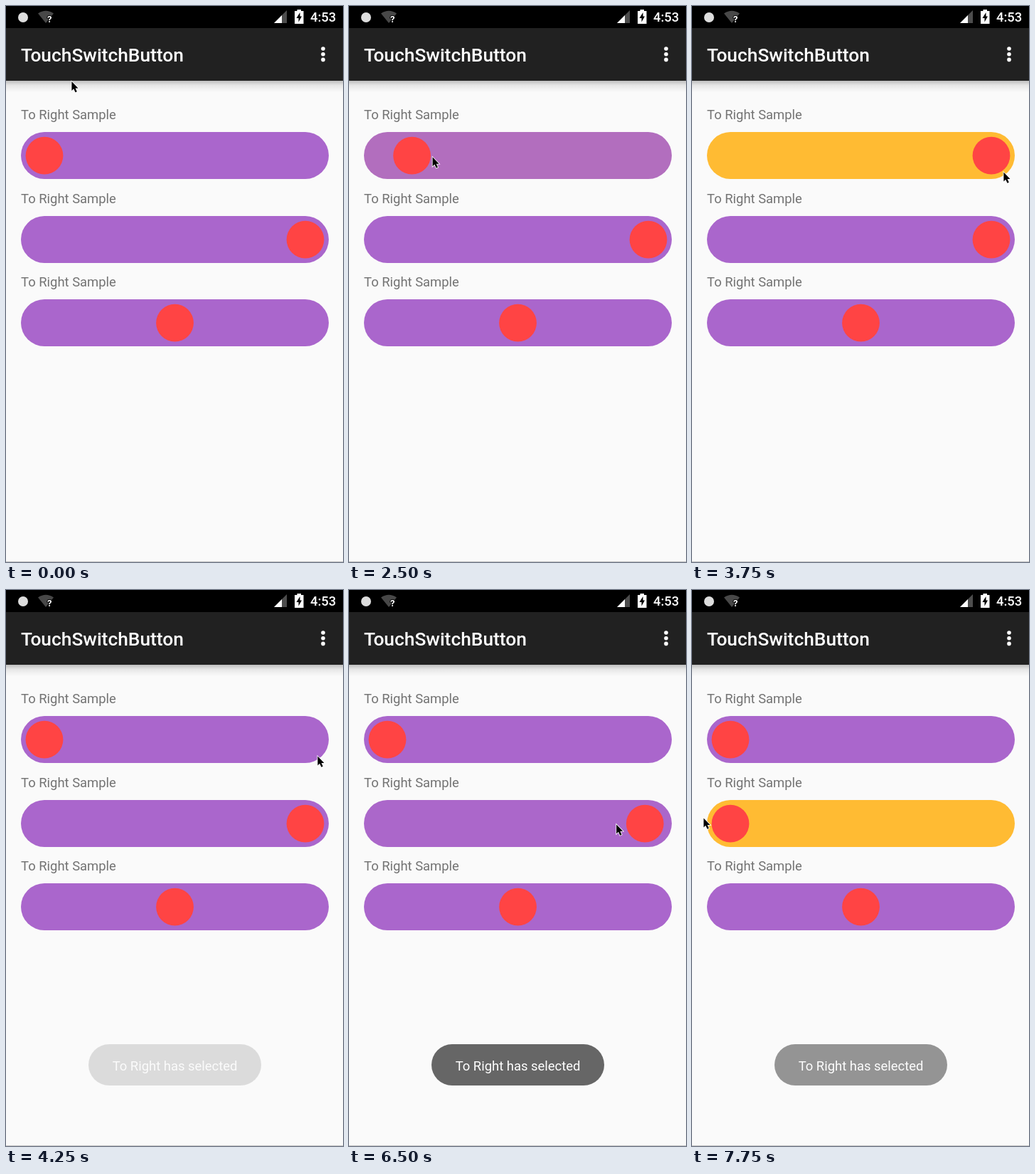
An HTML page that plays this animation: 474x781 px, repeating every 8000 ms.

```html
<!DOCTYPE html>
<html lang="en">
<head>
<meta charset="utf-8">
<title>Touch switch demo</title>
<style>
  html, body { margin: 0; width: 100%; height: 100%; overflow: hidden; background: #fafafa; }
  svg { display: block; width: 474px; height: 781px; font-family: Roboto, sans-serif; }
  #message { font-size: 21.07px; font-stretch: condensed; }
  #message.regular { font-size: 18.43px; font-stretch: normal; }
</style>
</head>
<body>
<svg viewBox="0 0 474 781">
  <defs>
    <linearGradient id="shade" x2="0" y2="1">
      <stop offset="0" stop-opacity=".24"/>
      <stop offset=".4" stop-opacity=".08"/>
      <stop offset="1" stop-opacity="0"/>
    </linearGradient>
  </defs>

  <rect width="474" height="781" fill="#fafafa"/>
  <rect y="105" width="474" height="16" fill="url(#shade)"/>
  <rect y="780" width="474" height="1" fill="#c8c8c8"/>

  <!-- status bar -->
  <rect width="474" height="31" fill="#000"/>
  <circle cx="24" cy="16" r="7" fill="#ddd"/>
  <path d="M45 10.5Q56 3 67 10.5L56 24Z" fill="#484848"/>
  <text x="58" y="23" font-size="13" font-weight="700" fill="#fff" stroke="#000" stroke-width="2" paint-order="stroke">?</text>
  <path d="M395 6V24H377Z" fill="#4d4d4d"/>
  <path d="M388 13V24H377Z" fill="#fff"/>
  <path d="M409.5 7V5H415V7H418.5V25H406V7Z" fill="#fff"/>
  <path d="M413.5 9L408.5 17H411.5V22.5L416 14.5H413.5Z" fill="#000"/>
  <text x="428" y="22" font-size="18.43" font-weight="500" fill="#fff">4:53</text>

  <!-- app bar -->
  <rect y="31" width="474" height="74" fill="#212121"/>
  <text x="21.07" y="77.7" font-size="26.33" font-weight="500" fill="#fff">TouchSwitchButton</text>
  <g fill="#fff">
    <circle cx="446" cy="60" r="2.8"/>
    <circle cx="446" cy="67.7" r="2.8"/>
    <circle cx="446" cy="75.4" r="2.8"/>
  </g>

  <g id="switches"></g>

  <g id="toast">
    <rect x="116" y="638" width="243" height="58" rx="29" fill="#666"/>
    <text id="message" x="237.5" y="675" text-anchor="middle" fill="#fff">To Right has selected</text>
  </g>

  <path id="cursor" d="M.4 .6V13.4L3.2 10.8L5.5 15.8L7.8 14.8L5.6 9.9H9.5Z"
        fill="#000" stroke="#fff" stroke-width="1.6" paint-order="stroke"/>
</svg>

<script>
const LOOP = 8000, STEP = 250;
const LEFT = 54, RIGHT = 421, MIDDLE = 237.5;
const ROW_TOP = 177, ROW_PITCH = 117.5;
const PURPLE = [170, 102, 204], AMBER = [255, 187, 51];

const switches = [
  { home: LEFT, goal: RIGHT, drag: { start: 2370, end: 3750, release: 4250 } },
  { home: RIGHT, goal: LEFT, drag: { start: 6490, end: 7262, release: LOOP } },
  { home: MIDDLE }
];

// The pointer travels by a distance in each move; bow bends the path sideways.
const pointer = { x: 92, y: 105.5 };
const moves = [
  { start: 0, end: 1250, dx: -27, dy: 105, bowX: 88, bowY: 70 },
  { start: 1250, end: 1750, dx: -12, dy: -3 },
  { start: 2250, end: 3750, dx: 385, dy: 25.5 },
  { start: 4750, end: 5250, dx: -185, dy: 160 },
  { start: 5250, end: 6000, dx: 160, dy: -59 },
  { start: 6421, end: 7263, dx: -397, dy: -14, bowY: -13 }
];

const byId = id => document.getElementById(id);
const ramp = (time, start, end) => Math.min(1, Math.max(0, (time - start) / (end - start)));

byId('switches').innerHTML = switches.map((_, row) => {
  const y = ROW_TOP + Math.round(row * ROW_PITCH);
  return `
    <text x="21.07" y="${y - 18}" font-size="18.43" fill="#737373">To Right Sample</text>
    <rect x="21" y="${y}" width="433" height="66" rx="33"/>
    <circle cy="${y + 33.2}" r="26.4" fill="#ff4444"/>`;
}).join('');
const tracks = byId('switches').querySelectorAll('rect');
const thumbs = byId('switches').querySelectorAll('circle');

// Without a condensed face the message is set smaller to fit its bubble.
if (byId('message').getComputedTextLength() > 190) byId('message').classList.add('regular');

function dragProgress(time, drag) {
  return drag && time < drag.release ? ramp(time, drag.start, drag.end) : 0;
}

function trackColor(progress) {
  return `rgb(${PURPLE.map((c, i) => Math.round(c + (AMBER[i] - c) * progress))})`;
}

function pointerAt(time) {
  let { x, y } = pointer;
  for (const { start, end, dx, dy, bowX = 0, bowY = 0 } of moves) {
    const part = ramp(time, start, end), bend = Math.sin(Math.PI * part);
    x += dx * part + bowX * bend;
    y += dy * part + bowY * bend;
  }
  return [x, y];
}

function draw(time) {
  switches.forEach(({ home, goal = home, drag }, i) => {
    const progress = dragProgress(time, drag);
    thumbs[i].setAttribute('cx', home + (goal - home) * progress);
    tracks[i].setAttribute('fill', trackColor(progress));
  });
  byId('toast').setAttribute('opacity', ramp(time, 4150, 4650) - ramp(time, 7600, 8070));
  byId('cursor').setAttribute('transform', `translate(${pointerAt(time)})`);
}

function tick() {
  const time = performance.now() % LOOP;
  draw(Math.floor(time / STEP) * STEP);
  requestAnimationFrame(tick);
}
tick();
</script>
</body>
</html>
```
